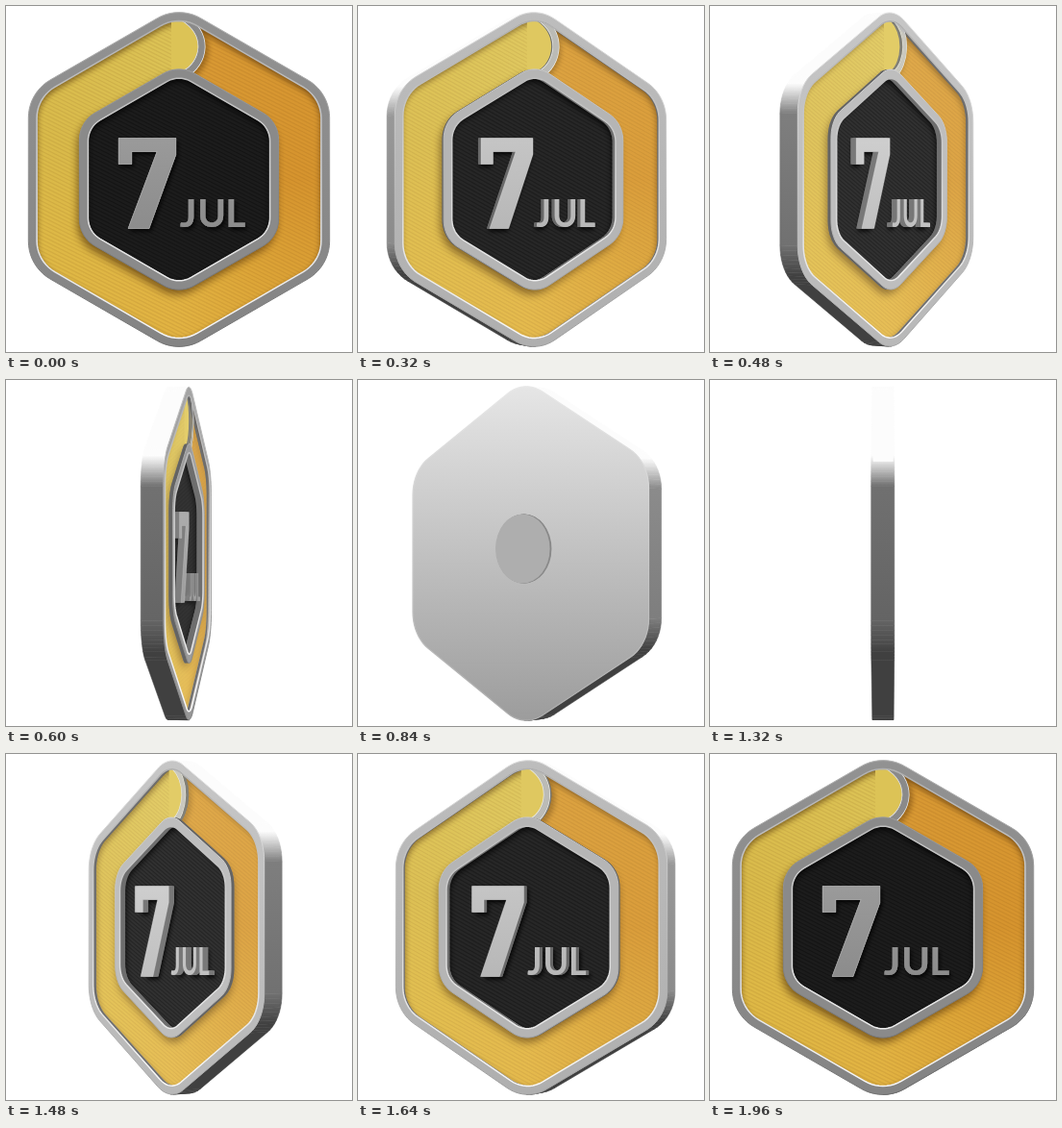
Recreate the animation shown at these times as an HTML page with a canvas. Size 360 by 360 pixels, loop 2 s.

```html
<!DOCTYPE html>
<html lang="en">
<head>
<meta charset="utf-8">
<title>Spinning badge</title>
<style>
  html, body { margin: 0; width: 100%; height: 100%; overflow: hidden; background: #fff; }
  canvas { display: block; width: 100vmin; height: 100vmin; }
</style>
</head>
<body>
<canvas id="stage" width="360" height="360" role="img" aria-label="7 JUL"></canvas>
<script>
const ctx = document.getElementById('stage').getContext('2d');
const LOOP = 2000, STEP = 40, TURN = 1960;
const CX = 180, CY = 180.5, CAMERA = 1800;
const FRONT = 11, BACK = -11, BAND = 7, FLOOR = 4;
const rad = Math.PI / 180;
let cos = 1, sin = 0, light = 138;

const gray = (v, a = 1) => {
  const n = Math.round(Math.max(0, Math.min(255, v)));
  return `rgba(${n},${n},${n},${a})`;
};
const mix = (a, b, t) => a + (b - a) * t;

// Rounded pointy-top hexagon; each point keeps the angle of its normal.
function hexagon(halfWidth, r) {
  const centre = (halfWidth - r) / Math.cos(30 * rad);
  const points = [];
  for (let corner = 0; corner < 360; corner += 60) {
    for (let turn = -30; turn <= 30; turn += 6) {
      const a = (corner + turn) * rad;
      points.push({
        x: centre * Math.sin(corner * rad) + r * Math.sin(a),
        y: -centre * Math.cos(corner * rad) - r * Math.cos(a),
        a
      });
    }
  }
  return points;
}

const outer = hexagon(155.7, 45);
const rimHole = hexagon(147, 37);
const frameOuter = hexagon(103, 32);
const frameHole = hexagon(94, 25);

function project({ x, y }, z) {
  const k = CAMERA / (CAMERA - (z * cos - x * sin));
  return [CX + (x * cos + z * sin) * k, CY + y * k];
}

function trace(z, ...shapes) {
  ctx.beginPath();
  for (const shape of shapes) {
    shape.forEach((p, i) => ctx[i ? 'lineTo' : 'moveTo'](...project(p, z)));
    ctx.closePath();
  }
}

function fill(style, z, ...shapes) {
  trace(z, ...shapes);
  ctx.fillStyle = style;
  ctx.fill('evenodd');
}

function outline(style, width, z, shape) {
  trace(z, shape);
  ctx.strokeStyle = style;
  ctx.lineWidth = width;
  ctx.stroke();
}

// Runs draw() in the flat coordinates of the plane at depth z.
function onPlane(z, draw) {
  ctx.save();
  ctx.transform(cos, 0, 0, 1, CX + z * sin, CY);
  draw();
  ctx.restore();
}

function withShadow(color, dx, dy, blur, draw) {
  ctx.save();
  ctx.shadowColor = color;
  ctx.shadowOffsetX = dx * cos;
  ctx.shadowOffsetY = dy;
  ctx.shadowBlur = blur;
  draw();
  ctx.restore();
}

function vertical(top, bottom, y0 = 5, y1 = 355) {
  const g = ctx.createLinearGradient(0, y0, 0, y1);
  g.addColorStop(0, gray(top));
  g.addColorStop(1, gray(bottom));
  return g;
}

function wallShade({ a, y }) {
  const up = Math.cos(a), toward = -Math.sin(a) * sin;
  const base = 106 + 70 * (1 - toward) - y * 0.1;
  return up > 0 ? mix(base, 252, Math.min(1, up * 1.5))
                : mix(base, 64, Math.min(1, -up * 1.5));
}

function drawWalls() {
  outer.forEach((p, i) => {
    const q = outer[(i + 1) % outer.length];
    if (-Math.sin((p.a + q.a) / 2) * sin <= 0 && Math.abs(p.a - q.a) < 3) return;
    const corners = [project(p, BACK), project(p, FRONT), project(q, FRONT), project(q, BACK)];
    const g = ctx.createLinearGradient(0, corners[0][1], 0, corners[3][1]);
    g.addColorStop(0, gray(wallShade(p)));
    g.addColorStop(1, gray(wallShade(q)));
    ctx.beginPath();
    corners.forEach(c => ctx.lineTo(...c));
    ctx.closePath();
    ctx.fillStyle = ctx.strokeStyle = g;
    ctx.lineWidth = 0.6;
    ctx.fill();
    ctx.stroke();
  });
}

function weave(z, style) {
  onPlane(z, () => {
    ctx.beginPath();
    for (let y = -270; y < 270; y += 4) {
      ctx.moveTo(-160, y - 80);
      ctx.lineTo(160, y + 80);
    }
    ctx.strokeStyle = style;
    ctx.lineWidth = 1.3;
    ctx.stroke();
  });
}

// Recess: lit walls seen through the opening, then the contents below.
function recess(hole, draw) {
  ctx.save();
  trace(FRONT, hole);
  ctx.clip();
  fill(vertical(85, 235), FRONT, outer);
  draw();
  ctx.restore();
  outline(vertical(175, 250), 1.5, FRONT, hole);
}

function foldPath() {
  ctx.beginPath();
  ctx.moveTo(2, -170);
  ctx.bezierCurveTo(34, -152, 26, -120, 6, -110);
  ctx.lineTo(-8, -102);
}

function strokeFold(style, width) {
  foldPath();
  ctx.strokeStyle = style;
  ctx.lineWidth = width;
  ctx.stroke();
}

function drawFold() {
  onPlane(BAND, () => {
    withShadow('rgba(70,35,0,.5)', 3, 3, 6, () => strokeFold(gray(105), 7));
    foldPath();
    ctx.lineTo(-8, -170);
    ctx.fillStyle = '#dcc356';
    ctx.fill();
  });
  for (let z = BAND; z < FRONT; z++) onPlane(z, () => strokeFold(gray(105), 7));
  onPlane(FRONT, () => {
    strokeFold(gray(235), 8);
    strokeFold(gray(light), 6.5);
  });
}

function drawBand() {
  trace(BAND, rimHole);
  onPlane(BAND, () => {
    const g = ctx.createConicGradient(-90 * rad, 0, 0);
    [[0, '#d99a34'], [0.25, '#d6942e'], [0.4, '#dda638'], [0.5, '#e2b342'],
     [0.65, '#dfb845'], [0.8, '#d9ba4a'], [1, '#dcc356']]
      .forEach(([at, color]) => g.addColorStop(at, color));
    ctx.fillStyle = g;
    ctx.fill();
  });
  weave(BAND, 'rgba(90,50,0,.09)');
  withShadow('rgba(60,30,0,.6)', 0, 3, 6, () => fill(gray(110), BAND, outer, rimHole));
  withShadow('rgba(60,30,0,.6)', -2, 5, 8, () => fill(gray(110), BAND, frameOuter));
  drawFold();
  fill(`rgba(255,245,190,${0.2 * Math.abs(sin)})`, BAND, rimHole);
}

function drawFrame() {
  for (let z = BAND; z < FRONT; z++) fill(gray(100), z, frameOuter);
  fill(gray(light), FRONT, frameOuter);
  outline(vertical(light + 30, light - 30), 1, FRONT, frameOuter);
}

function sevenPath() {
  ctx.beginPath();
  [[-63, -43], [-3, -43], [-3, -26], [-31, 51], [-53, 51],
   [-23, -29], [-49, -29], [-49, -16], [-63, -16]]
    .forEach(p => ctx.lineTo(...p));
  ctx.closePath();
}

function drawDate(style) {
  ctx.fillStyle = style;
  sevenPath();
  ctx.fill();
  ctx.font = '700 40px Lato, Inter, sans-serif';
  ctx.textAlign = 'center';
  [['J', 9.5], ['U', 34], ['L', 59]].forEach(([letter, x]) => ctx.fillText(letter, x, 49.5));
}

function drawCentre() {
  fill(gray(28 + 26 * Math.abs(sin)), FLOOR, frameHole);
  weave(FLOOR, 'rgba(0,0,0,.25)');
  withShadow('rgba(0,0,0,.8)', 0, 3, 6, () => fill(gray(110), FLOOR, outer, frameHole));
  onPlane(FLOOR, () =>
    withShadow('rgba(0,0,0,.8)', 2, 3, 4, () => drawDate(gray(90))));
  for (let z = FLOOR; z < FRONT; z++) onPlane(z, () => drawDate(gray(88 + 40 * Math.abs(sin))));
  onPlane(FRONT, () => {
    const g = ctx.createLinearGradient(0, -43, 0, 51);
    g.addColorStop(0, gray(light + 16));
    g.addColorStop(1, gray(light + 2));
    drawDate(g);
    sevenPath();
    ctx.strokeStyle = gray(235, 0.4);
    ctx.lineWidth = 0.8;
    ctx.stroke();
  });
}

function drawFront() {
  fill(vertical(light + 8, light - 6), FRONT, outer);
  outline(vertical(light + 40, light - 25), 1, FRONT, outer);
  recess(rimHole, () => {
    drawBand();
    drawFrame();
  });
  recess(frameHole, drawCentre);
}

function disc(z, style) {
  onPlane(z, () => {
    ctx.beginPath();
    ctx.arc(0, -5, 36, 0, 2 * Math.PI);
    ctx.fillStyle = style;
    ctx.fill();
  });
}

function drawBack() {
  fill(vertical(light + 38, light - 36), BACK, outer);
  outline(vertical(light + 40, light - 20), 1.2, BACK, outer);
  for (let z = BACK; z > BACK - 3; z--) disc(z, gray(light - 55));
  disc(BACK - 3, gray(light - 18));
}

function render() {
  const time = Math.floor(performance.now() % LOOP / STEP) * STEP;
  const u = time / TURN;
  const angle = 2 * Math.PI * u * u * (3 - 2 * u);
  cos = Math.cos(angle);
  sin = Math.sin(angle);
  // Flat faces catch most light when turned halfway.
  light = 138 + 55 * Math.abs(Math.sin(2 * angle));
  ctx.clearRect(0, 0, 360, 360);
  drawWalls();
  // The eye sits at a finite distance, so a face hides slightly before edge-on.
  const edge = FRONT / CAMERA;
  if (cos > edge) drawFront();
  else if (cos < -edge) drawBack();
  requestAnimationFrame(render);
}
render();
</script>
</body>
</html>
```
